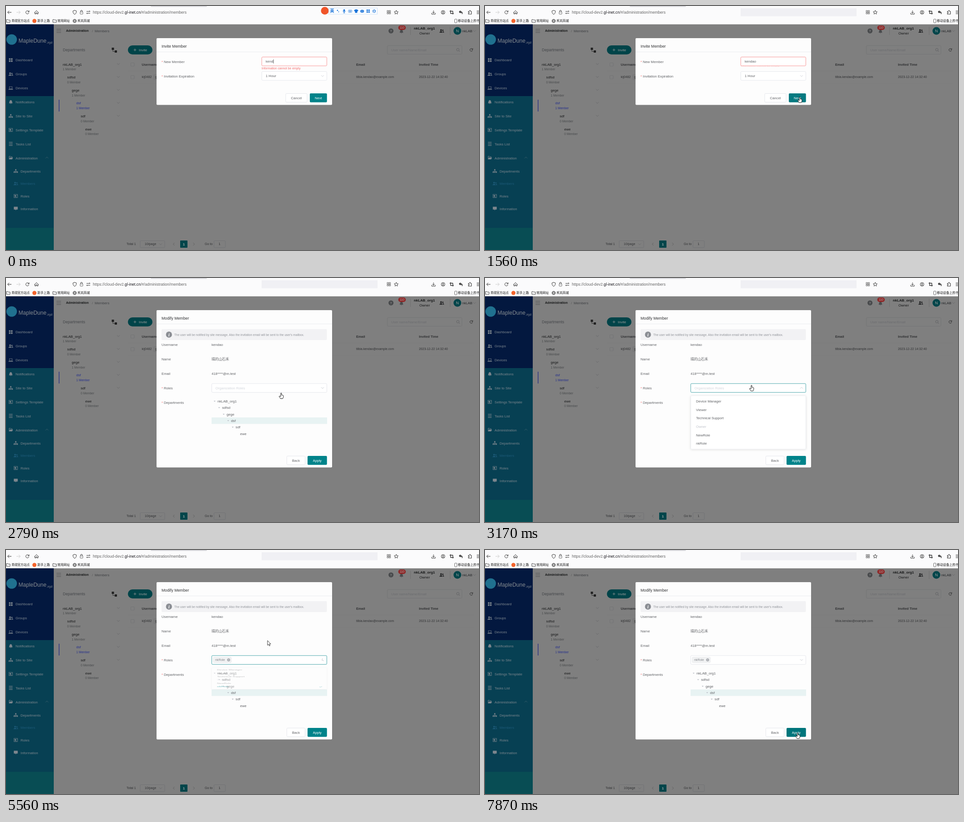
An HTML page for the animation above (7.99 s loop, 1040x539 px).

```html
<!DOCTYPE html>
<html lang="en">
<head>
<meta charset="utf-8">
<title>Invite member</title>
<style>
html, body { margin: 0; width: 100%; height: 100%; overflow: hidden; background: #7f7f7f; }
svg { display: block; width: 1040px; height: 539px; font-family: "Liberation Sans", "Noto Sans CJK SC", "Noto Sans CJK", sans-serif; }
</style>
</head>
<body>
<svg viewBox="0 0 1040 539">
  <defs>
    <filter id="shadow" x="-10%" y="-10%" width="120%" height="125%"><feDropShadow dx="0" dy="1" stdDeviation="2.5" flood-opacity=".12"/></filter>
  </defs>
  <g id="page"></g>
  <g id="live"></g>
</svg>
<script>
const DURATION = 7990, TEAL = '#00838a', INK = '#606266', RED = '#f56c6c';
const ORG = 'nkLAB_org1', ROLE = 'nkRole', MEMBER = 'kendao';
const $ = id => document.getElementById(id);

// y is the middle of the text line
const text = (x, y, s, size = 7.65, fill = INK, attrs = '') =>
  `<text x="${x}" y="${y + size * 0.35}" font-size="${size}" fill="${fill}" ${attrs}>${s}</text>`;
const bold = 'font-weight="bold"', mid = 'text-anchor="middle"', midBold = mid + ' ' + bold;
const rect = (x, y, w, h, fill, stroke = 'none', r = 0) =>
  `<rect x="${x}" y="${y}" width="${w}" height="${h}" rx="${r}" fill="${fill}" stroke="${stroke}" stroke-width=".7"/>`;
const circle = (x, y, r, fill, stroke = 'none') =>
  `<circle cx="${x}" cy="${y}" r="${r}" fill="${fill}" stroke="${stroke}"/>`;
const path = (d, stroke, width = 1, fill = 'none') =>
  `<path d="${d}" fill="${fill}" stroke="${stroke}" stroke-width="${width}" stroke-linejoin="round"/>`;
const at = (x, y, s, more = '') => `<g transform="translate(${x} ${y}) ${more}">${s}</g>`;
const chevron = (x, y, color, angle = 0) => at(x, y, path('M-3-1.5L0 1.5L3-1.5', color, .7), `rotate(${angle})`);

// small icons, centred on 0,0
const icon = {
  back: c => path('M4 0H-4M-1-3.5L-4.5 0L-1 3.5', c),
  reload: c => path('M3.2-1.5A3.5 3.5 0 1 0 3.4 1M3.8-4V-1H.8', c),
  home: c => path('M-3.5 0V3.5H-1V1H1V3.5H3.5V0M-4.5 .5L0-3.8L4.5 .5', c),
  shield: c => path('M0-4.5L3.8-3Q4 2.5 0 4.5Q-4 2.5-3.8-3Z', c),
  lock: c => rect(-3, -1, 6, 5, 'none', c, 1) + path('M-2-1V-2.5A2 2 0 0 1 2-2.5V-1', c),
  swap: c => path('M-4-2H4L2-3.5M4 2H-4L-2 3.5', c),
  grid: c => [[-4, -4], [.5, -4], [-4, .5], [.5, .5]].map(p => rect(...p, 3, 3, 'none', c)).join(''),
  star: c => path('M0-4.5L1.3-1.4L4.5-1.1L2 .9L2.8 4L0 2.2L-2.8 4L-2 .9L-4.5-1.1L-1.3-1.4Z', c, .9),
  down: c => path('M0-4V2M-2.5-.5L0 2L2.5-.5M-4 1.5V4H4V1.5', c),
  user: c => circle(0, 0, 4, 'none', c) + circle(0, -1, 1.3, c) + path('M-2.2 2.3Q0 .5 2.2 2.3', c),
  crop: c => path('M-2.5-4.5V2.5H4.5M-4.5-2.5H2.5V4.5', c, 1.3),
  undo: c => path('M-1-4L-4-1L-1 2V0Q3 0 3 4Q5-2-1-2Z', c, .6, c),
  puzzle: c => path('M-3.5-2H-1Q-1.5-4.5 .3-4.5T1.5-2H3.5V4H-3.5V2Q-1 2-1 .8T-3.5 0Z', c),
  menu: c => path('M-4-3H5M-4 0H5M-4 3H5', c),
  folder: c => path('M-4 3V-3H-1L0-2H4V3Z', c, .9),
  openFolder: c => path('M-3.5 3V-3.5H-1L0-2.5H3V-1', c, .9) + path('M-3.5 3L-2-.5H4.5L3 3Z', c, .5, c),
  globe: c => circle(0, 0, 3.7, 'none', c) + path('M-3.7 0H3.7M0-3.7Q-3.5 0 0 3.7Q3.5 0 0-3.7', c, .7),
  phone: c => rect(-2.5, -4, 5, 8, 'none', c, 1),
  bars: c => path('M-4-3.5H4M-4 0H4M-4 3.5H4', c, 1.1),
  tiles: c => [[-4, -4], [.5, -4], [-4, .5], [.5, .5]].map(p => rect(...p, 3.4, 3.4, c)).join(''),
  people: c => circle(-1.5, -1.8, 1.8, c) + circle(2.5, -1.3, 1.4, c) + path('M-5 3.5Q-1.5-2 2 3.5ZM3 3.5H5Q4.5 .5 2.5 .7Z', c, .3, c),
  laptop: c => rect(-3.2, -3, 6.4, 4.6, 'none', c) + path('M-4.8 3H4.8', c, 1.4),
  bell: c => path('M-3.5 2.5Q-2.5 1-2.5-1Q-2-3.8 0-3.8T2.5-1Q2.5 1 3.5 2.5ZM-1 3.8H1', c, .8, c),
  tree: c => path('M0-1V1M-3.5 2V.5H3.5V2', c, .8) + rect(-1.3, -4, 2.6, 2.6, c) + rect(-4.6, 1.5, 2.4, 2.4, c) + rect(-1.2, 1.5, 2.4, 2.4, c) + rect(2.2, 1.5, 2.4, 2.4, c),
  card: c => rect(-4, -3.6, 8, 7.2, 'none', c) + rect(-2.5, -2, 3, 3, c) + path('M1.5-1.5H3M-2.5 2.2H2.5', c, .9),
  note: c => path('M-4-3.5H4V2H1L0 3.8L-1 2H-4Z', c, .6, c),
  mic: c => rect(-1.7, -4.8, 3.4, 6, c, 'none', 1.7) + path('M-3-1Q-3 2.4 0 2.4T3-1M0 2.4V4.5M-2 4.5H2', c),
  keyboard: c => rect(-4.3, -3, 8.6, 6.2, 'none', c, 1) + path('M-3-1H3M-3 .5H3M-2 2H2', c, .8),
  shirt: c => path('M-2-4H2L5-2L3.5 .5L2.5 0V4H-2.5V0L-3.5 .5L-5-2Z', c, .5, c),
  mask: c => rect(-4.5, -3, 9, 6.5, c, 'none', 3) + circle(-1.8, 0, 1, '#fff') + circle(1.8, 0, 1, '#fff'),
  gear: c => circle(0, 0, 2.4, 'none', c) + path('M0-4.5V-2.4M0 2.4V4.5M-4-2.2L-2-1.2M4-2.2L2-1.2M-4 2.2L-2 1.2M4 2.2L2 1.2', c, 1.5),
};
const put = (name, x, y, c) => at(x, y, icon[name](c));

function browserBar() {
  const c = '#333';
  const tools = [['back', 8], ['reload', 47], ['home', 67], ['shield', 151], ['lock', 166], ['swap', 181], ['grid', 842],
    ['star', 858], ['down', 940], ['user', 961], ['crop', 980], ['undo', 1000], ['puzzle', 1020], ['menu', 1039]];
  const url = 'https://cloud-dev2.<tspan fill="#15141a">gl-inet.cn</tspan>/#/administration/members';
  return rect(0, 0, 1040, 40.5, '#fbfbfc') + rect(318, -4, 124, 6, '#d8d8dc', 'none', 2)
    + tools.map(([n, x]) => put(n, x, 14, c)).join('')
    + at(27, 14, icon.back('#ccc'), 'scale(-1 1)')
    + text(191, 14, url, 8.58, '#666')
    + put('folder', 5, 33, c) + text(12, 33, '青砚官方站点', 6.7, '#111')
    + circle(62.5, 33, 4.5, '#f4642c') + text(69, 33, '新手上路', 6.8, '#111')
    + put('folder', 107, 33, c) + text(113, 33, '常用网址', 6.8, '#111')
    + put('globe', 151, 33, c) + text(157, 33, '禾岚商城', 6.8, '#111')
    + put('phone', 989, 33, c) + text(993.5, 33, '移动设备上的书', 6.8, '#111');
}

function sidebar() {
  const c = '#7d868e';
  const main = [['Dashboard', 'tiles'], ['Groups', 'people'], ['Devices', 'laptop'], ['Notifications', 'bell'], ['Site to Site', 'tree'],
    ['Settings Template', 'card'], ['Tasks List', 'bars'], ['Administration', 'openFolder']];
  const sub = [['Departments', 'tree'], ['Members', 'people'], ['Roles', 'card'], ['Information', 'note']];
  return rect(0, 40.5, 105, 158.5, '#03183f') + rect(0, 199, 105, 291, '#074053') + rect(0, 490, 105, 49, '#084d54')
    + circle(12.5, 74, 11.5, '#20718f')
    + text(27.5, 77, 'MapleDune', 12, '#858b90') + text(89, 80, '.xyz', 7.6, '#858b90')
    + main.map(([s, n], i) => put(n, 10.5, 119.5 + i * 30.85, c) + text(21, 119.7 + i * 30.9, s, 7.7, c)).join('')
    + chevron(90, 335, '#4f6b78', 180)
    + sub.map(([s, n], i) => {
      const color = i == 1 ? '#1d5a78' : c;
      return put(n, 21.5, 364.5 + i * 27.6, color) + text(32, 365.2 + i * 27.6, s, 7.7, color);
    }).join('');
}

function header() {
  const c = '#3f4144', ink = '#161718';
  return at(116, 55, path('M-5-3.7H5M-5 0H5M-5 3.7H5', '#4a4b4d', .8)) + text(132, 55, 'Administration', 7.05, ink, bold)
    + text(189, 55, '/', 7.6, '#555') + text(195, 55, 'Members', 7.75, c)
    + circle(846.5, 55, 5.5, '#484a4c') + text(846.5, 55, '?', 8, '#808080', midBold)
    + put('bell', 869.5, 56, '#484a4c') + rect(862.5, 43, 16.5, 10, '#8f2727', 'none', 5) + text(870.7, 48, '110', 6.5, '#aaa', mid)
    + path('M889.5 46V64M976.5 46V64', '#6b6b6b', .8)
    + text(920, 49, ORG, 7.8, ink, midBold) + text(920.5, 60, 'Owner', 7.8, ink, mid)
    + put('people', 958, 55, ink) + circle(992.5, 55, 8.5, '#00454a') + text(992.5, 55, 'N', 9, '#999', mid)
    + text(1003, 55, 'nkLAB', 7.6, '#26282b') + chevron(1030, 55, '#606164');
}

function departments() {
  const names = [ORG, 'sdfsd', 'gege', 'dsf', 'sdf', 'ewe'], counts = [1, 0, 1, 1, 0, 0];
  return text(125, 97, 'Departments', 8.55, '#44464a') + rect(232.5, 92, 5, 5, '#222') + rect(239, 98, 5, 5, '#222')
    + path('M235 97V100.5H239', '#222', .8) + rect(116, 207, 1.3, 26, '#232c85')
    + names.map((s, i) => {
      const x = 124.7 + i * 9.9, y = 129 + i * 28.6, on = i == 3;
      return text(x, y, s, 7.65, on ? '#252f8c' : '#18191a')
        + text(x, y + 11, `${counts[i]} Member`, 6.6, on ? '#252f8c' : '#484a4c')
        + (i < 5 ? chevron(247, y - 1, '#606164') : '');
    }).join('');
}

function table() {
  const c = '#303133', line = '#707173';
  return rect(268, 87, 54, 20, '#004449', 'none', 10) + path('M283.5 94V100M280.5 97H286.5', '#999', .8) + text(292, 97, 'Invite', 7.7, '#999')
    + rect(274.5, 125.5, 7.5, 7.5, '#7f7f7f', line, 1) + rect(274.5, 153.5, 7.5, 7.5, '#7f7f7f', line, 1)
    + path('M268 143.5H1029M268 171.5H1029', '#7b7c7d', .7)
    + text(298.5, 129, 'Username', 7.3, c, bold) + text(298.5, 157, 'kij0482', 6.9, c)
    + rect(325, 151, 20, 12, '#7b7b7b', '#747577', 1) + text(328, 157, 'g', 6.5, c)
    + text(770, 129, 'Email', 7.3, c, bold) + text(908, 129, 'Invited Time', 7.3, c, bold)
    + text(770, 157, 'tilbia.kendao@example.com', 6.6, c) + text(908, 157, '2023-12-22 14:32:40', 6.85, c)
    + rect(838.5, 87.5, 164, 19, '#7f7f7f', line, 2) + text(847, 97, 'User name/Name/Email', 7.3, '#6c6d70')
    + circle(993.5, 96.5, 2.8, 'none', '#606164') + path('M995.5 98.5L998 101', '#606164') + at(1023, 97, icon.reload('#222'), 'scale(.85)');
}

function pager() {
  const c = '#303133', line = '#6e6f73';
  return text(265, 526, 'Total 1', 7, c) + rect(295, 518.5, 54, 15.2, 'none', line, 1.5) + text(305, 526, '10/page', 7, c) + chevron(340, 526, '#606164')
    + chevron(369, 526, '#555', 90) + rect(383, 518, 16, 16, '#00454a', 'none', 1) + text(391, 526, '1', 7.3, '#aaa', midBold)
    + chevron(413, 526, '#555', -90) + text(437, 526, 'Go to', 7, c) + rect(457.3, 518.5, 25, 15.2, 'none', line, 1.5) + text(469.5, 526, '1', 7, c, mid);
}

const button = (x, y, w, s, fill) => (fill ? rect(x, y, w, 19.7, fill, 'none', 2) : rect(x, y + .3, w, 19.2, '#fff', '#dcdfe6', 2))
  + text(x + w / 2, y + 10, s, 7.65, fill ? '#fff' : INK, mid);
const label = (y, s, required) => (required ? text(342, y + .5, '*', 7.6, RED) : '') + text(required ? 347 : 342, y, s, 7.7);
const frame = (h, title) => rect(331, 71, 386, h, '#fdfdfd', 'none', 2) + text(342, 89, title, 8.75, '#303133')
  + path('M331 101.5H717', '#e8e9ec', .8);

function imeBar() {
  const c = '#1a73d9';
  const glyphs = ['mic', 'keyboard', 'shirt', 'mask', 'tiles', 'gear'];
  return circle(701, 10.5, 8.5, '#f0552a') + rect(709.5, 4.5, 107, 13.5, '#fdfeff', '#b5d3f2')
    + text(717, 11, '英', 9, c, midBold) + text(730, 10, '•,', 9, c, midBold)
    + glyphs.map((n, i) => at(743.5 + i * 13.2, 11.3, icon[n](c), 'scale(.9)')).join('');
}

function inviteDialog(t) {
  const typed = MEMBER.slice(0, t < 140 ? 4 : t < 260 ? 5 : 6);
  const caret = 571.5 + (0.5 + 0.556 * (typed.length - 1)) * 7.65;
  const error = text(562, 138, 'Information cannot be empty', 6.75, RED);
  return frame(147.4, 'Invite Member') + label(123, 'New Member', true) + label(155, 'Invitation Expiration', true)
    + rect(562.4, 112.7, 143, 19.5, '#fff', RED, 2) + text(571, 122.7, typed)
    + (t < 630 ? path(`M${caret} 118V127`, '#222', .7) : '')
    + (t < 1560 ? error : `<g opacity=".25" transform="translate(0 81) scale(1 .38)">${error}</g>`)
    + rect(562.4, 144.7, 143, 19.5, '#fff', '#dcdfe6', 2) + text(571, 154.7, '1 Hour') + chevron(696, 154.5, '#c0c4cc')
    + button(615, 193, 47, 'Cancel') + button(668, 193, 37.7, 'Next', t < 1300 ? TEAL : '#067a81');
}

function departmentTree(t, cur) {
  const pitch = 14.35;
  const hover = t >= 5680 && cur.x > 452 && cur.x < 706 ? Math.floor((cur.y - 265) / pitch) : -1;
  return [ORG, 'sdfsd', 'gege', 'dsf', 'sdf', 'ewe'].map((s, i) => {
    const x = 465 + i * 9.95, y = 272.2 + i * pitch;
    const fill = i == 3 ? '#e8f3f3' : i == hover ? '#f5f7fa' : 'none';
    return rect(452, y - 7.2, 254, pitch, fill) + text(x, y, s, 7.7)
      + (i < 5 ? at(x - 6.3, y, path('M-2-1H2L0 1.3Z', 'none', 0, '#b6bac2')) : '');
  }).join('');
}

function roleMenu(t, cur) {
  const pitch = 18.6, scale = t < 3170 ? .65 : t < 5560 ? 1 : .4;
  const hover = Math.floor((cur.y - 263.3) / pitch), picked = t >= 4740;
  const rows = ['Device Manager', 'Viewer', 'Technical Support', 'Owner', 'NewRole', ROLE].map((s, i) => {
    const y = 12.6 + i * pitch, on = picked && i == 5;
    return (i == hover && i != 3 ? rect(.5, y - 9.3, 253, pitch, '#f5f7fa') : '')
      + text(12, y, s, 7.65, i == 3 ? '#c0c4cc' : on ? TEAL : INK, on ? bold : '')
      + (on ? path(`M237 ${y}l2 2l4-4`, TEAL, .9) : '');
  }).join('');
  const panel = `<g filter="url(#shadow)">${rect(.4, 0, 253, 118, '#fff', '#e4e7ed', 2)}</g>`;
  return `<g opacity="${scale}">${at(452, 260, panel + rows, `scale(1 ${scale})`)}</g>`;
}

function modifyDialog(t, cur) {
  const open = t >= 3050 && t < 5680;
  const overSelect = cur.y > 233 && cur.y < 253;
  const angle = t < 3050 ? 0 : t < 3170 ? 90 : t < 5560 ? 180 : t < 5680 ? 60 : t < 5830 ? 15 : 0;
  const note = "The user will be notified by site message. Also the invitation email will be sent to the user's mailbox.";
  const tag = rect(455.5, 236.5, 40, 12.5, '#f1f2f3', '#e6e7ea', 2) + text(460, 242.8, ROLE, 6.9, '#85888e')
    + circle(489.5, 242.8, 3.2, '#a4a7ad') + path('M488.3 241.6l2.4 2.4m0-2.4l-2.4 2.4', '#fff', .7);
  return frame(347.4, 'Modify Member')
    + rect(342, 113, 363.5, 24, '#f2f2f4', 'none', 2) + circle(358.3, 125, 6.7, '#8b8e94')
    + text(358.3, 125, 'i', 10, '#fff', midBold + ' font-family="Liberation Serif, serif" font-style="italic"')
    + text(370, 126, note, 6.5, '#909399')
    + label(147, 'Username') + text(452, 147, MEMBER) + label(179, 'Name') + text(452, 179, '晴的山石禾', 7.7)
    + label(211, 'Email') + text(452, 211, '418****@m.test') + label(243, 'Roles', true) + label(275, 'Departments', true)
    + (open && t >= 3170 && t < 5560 ? '' : departmentTree(t, cur))
    + rect(452.4, 233.2, 253, 19.5, '#fff', open ? TEAL : overSelect ? '#c0c4cc' : '#dcdfe6', 2)
    + (t < 4740 ? text(460.5, 243, 'Organization Roles', 7.65, '#d3d6dc') : tag)
    + chevron(696, 242.8, '#b4b8c0', angle)
    + (open ? roleMenu(t, cur) : '')
    + button(617.5, 393, 40, 'Back') + button(663, 393, 42.7, 'Apply', t < 7870 ? TEAL : '#00757b');
}

// pointer stops: time, x, y, shape
const stops = [
  [910, 590, 132, 'beam'], [1060, 612, 150, 'arrow'], [1180, 652, 177, 'arrow'], [1300, 701, 202, 'hand'], [1420, 692, 201, 'hand'],
  [1690, 692, 201, 'arrow'], [2400, 676, 210, 'arrow'], [2550, 652, 222, 'arrow'], [2670, 626, 238, 'hand'], [2790, 605, 254, 'hand'],
  [2910, 590, 248, 'hand'], [3050, 586, 237, 'hand'], [3290, 585, 262, 'hand'], [3410, 581, 292, 'hand'], [3530, 578, 322, 'hand'],
  [3650, 576, 346, 'hand'], [3770, 575, 361, 'hand'], [4900, 552, 310, 'hand'], [5020, 541, 250, 'hand'], [5140, 575, 200, 'arrow'],
  [6210, 577, 236, 'hand'], [6330, 579, 276, 'hand'], [6450, 581, 316, 'hand'], [6570, 587, 350, 'hand'], [6840, 579, 345, 'hand'],
  [6990, 560, 325, 'hand'], [7110, 549.5, 305.5, 'hand'], [7230, 602, 334, 'hand'], [7350, 690, 367, 'arrow'], [7500, 687, 385, 'arrow'],
  [7620, 687.5, 404, 'hand'],
];
const pointer = {
  none: '',
  beam: path('M-2 0H2M0 0V11M-2 11H2', '#222', .8),
  arrow: path('M0 0V10.5L2.3 8.3L4 12L5.7 11.2L4 7.6H7.2Z', '#111', .8, '#fff'),
  hand: path('M-1 .5Q0-.5 1 .5V4.5L4 5Q5.2 5.5 5 7Q5 10 3.5 12.5H-1.5Q-2.5 10-4.5 8Q-4.5 6.2-2.7 7L-1 8Z', '#111', .9, '#fff'),
};

function scene(t) {
  const [, x, y, shape] = stops.findLast(s => s[0] <= t) || [0, 0, 0, 'none'];
  const cur = { x, y };
  return (t < 1560 ? imeBar() : rect(562, 5, 255, 17.5, '#f0f0f4'))
    + (t < 1690 ? inviteDialog(t) : modifyDialog(t, cur)) + at(x, y, pointer[shape]);
}

$('page').innerHTML = rect(0, 0, 1040, 539, '#7f7f7f') + browserBar() + sidebar() + header() + departments() + table() + pager();
let shown = '';
function draw() {
  const next = scene(performance.now() % DURATION);
  if (next !== shown) $('live').innerHTML = shown = next;
  requestAnimationFrame(draw);
}
draw();
</script>
</body>
</html>
```
